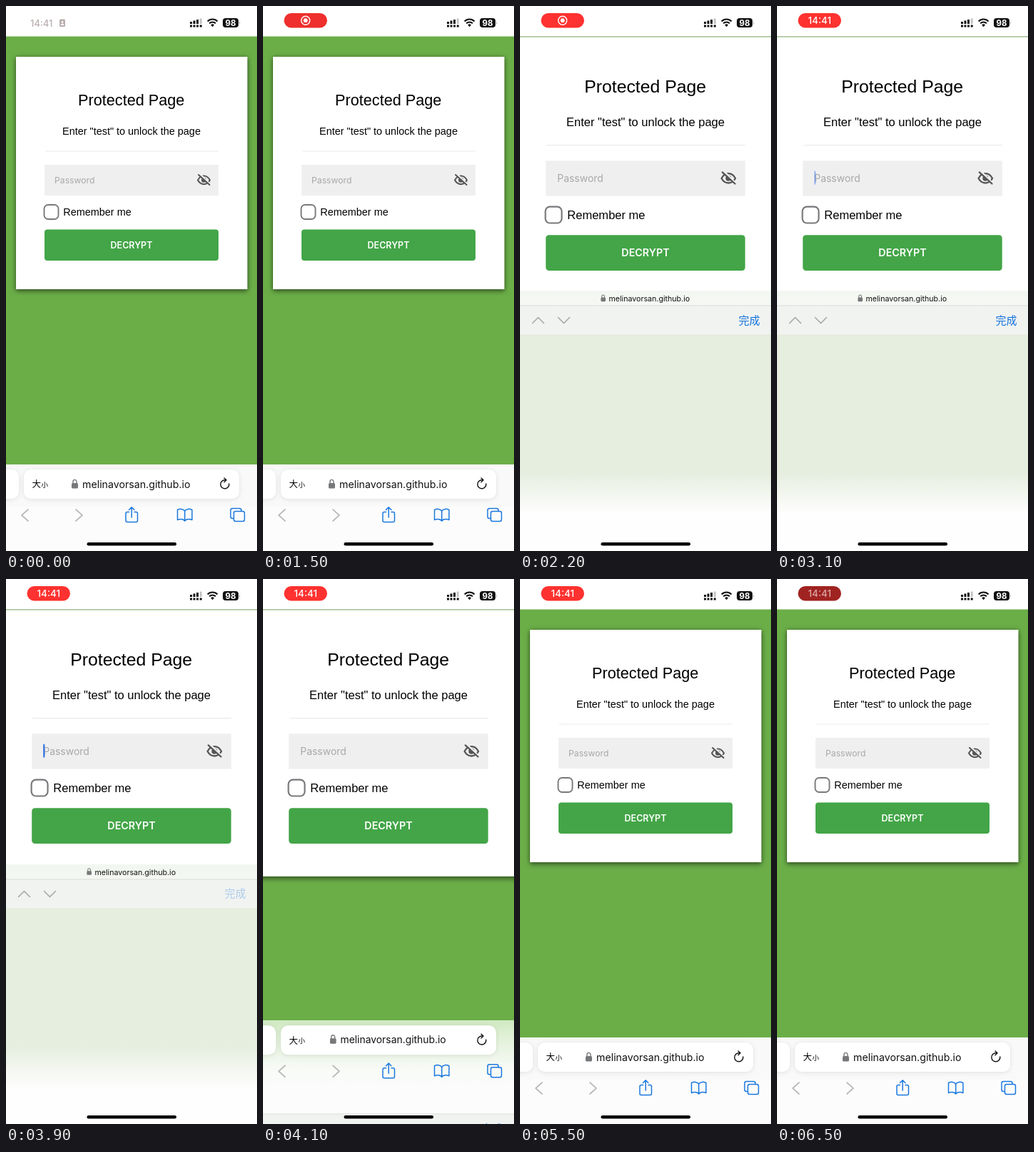
Animation, 352 px wide and 762 px high, one loop 6600 ms. Source, as an HTML page:

```html
<!DOCTYPE html>
<html lang="en">
<head>
<meta charset="utf-8">
<title>Protected Page</title>
<style>
html, body { margin: 0; width: 100%; height: 100%; overflow: hidden; background: #fff; }
svg { display: block; width: 352px; height: 762px; }
text { font-family: Inter, Roboto, sans-serif; }
.form text { font-family: "Liberation Sans", Arial, sans-serif; }
.form .ui { font-family: Inter, Roboto, sans-serif; }
text.cjk { font-family: "Noto Sans CJK SC", "Noto Sans CJK", sans-serif; }
.mid { text-anchor: middle; }
.line { fill: none; stroke-linecap: round; stroke-linejoin: round; }

.form, .bar, .tools, .tint, .url, .keys, .caret, .done, .pill, .pillbg, .rec, .time, .idle {
  animation: 6.6s linear infinite;
}
.card { filter: drop-shadow(0 0 3px rgba(0,0,0,.25)) drop-shadow(0 3px 3px rgba(0,0,0,.4)); }

.form { animation-name: zoom; transform-origin: 176px 0; }
@keyframes zoom {
  0%, 24.24% { transform: none; animation-timing-function: ease-in-out; }
  31.06%, 71.97% { transform: translateY(-38px) scale(1.146); animation-timing-function: cubic-bezier(.4,0,.6,1); }
  78.79%, 100% { transform: none; }
}

.bar { animation-name: bar; }
@keyframes bar {
  0%, 23.48% { transform: none; animation-timing-function: cubic-bezier(.2,.7,.3,1); }
  29.55%, 59.09% { transform: translateY(-243px); animation-timing-function: cubic-bezier(.4,.2,.7,.9); }
  62.12% { transform: translateY(-24px); animation-timing-function: ease-out; }
  64.85%, 100% { transform: none; }
}

.url { animation-name: url; transform-origin: 177px 669px; }
@keyframes url {
  0%, 23.48% { transform: none; animation-timing-function: cubic-bezier(.2,.7,.3,1); }
  29.55%, 59.09% { transform: translateY(-260px) scale(.75); animation-timing-function: cubic-bezier(.4,.2,.7,.9); }
  62.12% { transform: translateY(-25px) scale(.978); animation-timing-function: ease-out; }
  64.85%, 100% { transform: none; }
}

.keys { animation-name: keys; }
@keyframes keys {
  0%, 23.48% { transform: translateY(345px); animation-timing-function: cubic-bezier(.2,.7,.3,1); }
  29.55%, 59.09% { transform: none; animation-timing-function: cubic-bezier(.4,.2,.7,.9); }
  62.12% { transform: translateY(329px); animation-timing-function: ease-out; }
  64.4%, 100% { transform: translateY(345px); }
}

.tools { animation-name: tools; }
@keyframes tools {
  0%, 23.48% { opacity: 1; }
  25.76%, 59.85% { opacity: 0; }
  61.8%, 100% { opacity: 1; }
}

.tint { animation-name: tint; }
@keyframes tint {
  0%, 23.48% { opacity: 0; }
  29.55%, 59.09% { opacity: .12; }
  61.5%, 64% { opacity: 1; }
  74.24% { opacity: .45; }
  78.79%, 100% { opacity: 0; }
}

.caret { animation-name: caret; }
@keyframes caret {
  0%, 38.6% { opacity: 0; }
  39.4%, 46.2% { opacity: 1; }
  47.7%, 53.8% { opacity: 0; }
  54.6%, 60% { opacity: 1; }
  60.6%, 100% { opacity: 0; }
}

.done { animation-name: done; }
@keyframes done {
  0%, 56.8% { opacity: 1; }
  57.6%, 59.2% { opacity: .3; }
  61.5%, 100% { opacity: 1; }
}

.pill { animation-name: pill; }
@keyframes pill {
  0%, 1% { opacity: 0; }
  6%, 100% { opacity: 1; }
}
.pillbg { animation-name: pillbg; }
@keyframes pillbg {
  0%, 22.8% { fill: #ee2f2d; }
  30%, 65% { fill: #fe3230; }
  74.24% { fill: #d83029; }
  78.79% { fill: #fe3230; animation-timing-function: step-end; }
  98.4%, 100% { fill: #a02321; }
}
.rec { animation-name: rec; }
@keyframes rec {
  0%, 41% { opacity: 1; }
  43.5%, 100% { opacity: 0; }
}
.time { animation-name: time; }
@keyframes time {
  0%, 42.5% { opacity: 0; }
  45.5% { opacity: 1; animation-timing-function: step-end; }
  98.4%, 100% { opacity: .6; }
}
.idle { animation-name: idle; }
@keyframes idle {
  0% { opacity: 1; }
  3.5%, 100% { opacity: 0; }
}
</style>
</head>
<body>
<svg viewBox="0 0 352 762">
  <defs>
    <linearGradient id="fade" x2="0" y2="1">
      <stop stop-color="#cfe9bf"/>
      <stop offset="1" stop-color="#fff" stop-opacity="0"/>
    </linearGradient>
    <linearGradient id="board" x2="0" y2="1">
      <stop offset=".68" stop-color="#e6eedf"/>
      <stop offset=".85" stop-color="#fefefe"/>
    </linearGradient>
    <g id="lock">
      <rect x="92" y="667" width="9" height="7.6" rx="1.5" fill="#77787a"/>
      <path class="line" d="M94 667v-2a2.5 2.6 0 0 1 5 0v2" stroke="#77787a" stroke-width="1.4"/>
    </g>
  </defs>

  <rect width="352" height="762" fill="#6bae48"/>

  <g class="form">
    <rect class="card" x="14" y="71" width="324.5" height="325" fill="#fff"/>
    <text class="mid" x="175.7" y="138.5" font-size="21.65">Protected Page</text>
    <text class="mid" x="176" y="180" font-size="14.43">Enter "test" to unlock the page</text>
    <path d="M55 203h243" stroke="#ebebeb"/>
    <rect x="54" y="222" width="244" height="43" fill="#f0eff0"/>
    <text class="ui" x="68" y="247.6" font-size="12.2" fill="#a8a8aa">Password</text>
    <rect class="caret" x="68" y="234.5" width="1.8" height="16.5" rx=".8" fill="#2b6fe6"/>
    <g class="line" stroke="#555" stroke-width="2">
      <path d="M269 243.5c4.2-8 12.800-8 17 0c-4.200 7.500-12.800 7.500-17 0z"/>
      <circle cx="277.500" cy="243.300" r="2.500" fill="#555"/>
      <path d="M271.500 235l14.500 14.500" stroke="#f0eff0" stroke-width="3"/>
      <path d="M270 236l15.500 14"/>
    </g>
    <rect x="53.500" y="278" width="20" height="20" rx="5.500" fill="#fff" stroke="#79797d" stroke-width="1.900"/>
    <text x="80.300" y="293" font-size="14.430">Remember me</text>
    <rect x="54" y="312.500" width="244" height="43.500" rx="4" fill="#43a547"/>
    <text class="ui mid" x="176" y="338.800" font-size="12.500" font-weight="600" fill="#fff">DECRYPT</text>
  </g>

  <g class="bar">
    <rect y="641" width="352" height="400" fill="#f8f9f8"/>
    <rect y="700" width="352" height="341" fill="#fcfcfc"/>
    <rect class="tint" y="641" width="352" height="105" fill="url(#fade)"/>
    <g class="tools">
      <g fill="#fff" style="filter:drop-shadow(0 1px 3px rgba(0,0,0,.1))">
        <rect x="-20" y="648" width="38" height="41" rx="10"/>
        <rect x="25" y="648" width="302" height="41" rx="10"/>
      </g>
      <text class="cjk" x="36.500" y="673.300" font-size="12.500" font-weight="500">大</text>
      <text class="cjk" x="49.500" y="673" font-size="9.500" font-weight="500">小</text>
      <g class="line" stroke="#111" stroke-width="1.400">
        <path d="M312.800 668a6 6 0 1 1-5.800-5.200h1.500"/>
        <path d="M306 660l3 2.800-3 3"/>
      </g>
      <g class="line" stroke="#b9babc" stroke-width="1.700">
        <path d="M31 704l-9 8 9 8M98 704l9 8-9 8"/>
      </g>
      <g class="line" stroke="#1c78de" stroke-width="1.500">
        <path d="M172.500 707.500h-2.500a2 2 0 0 0-2 2v10a2 2 0 0 0 2 2h12.500a2 2 0 0 0 2-2v-10a2 2 0 0 0-2-2h-2.500M176.200 715v-14M172.500 704.500l3.700-3.800 3.700 3.800"/>
        <path d="M250.700 706c-2-3.200-7-3.200-10.200-1.500v14c3.200-1.500 8.200-1.500 10.200 1.500c2-3 7-3 10.200-1.500v-14c-3.200-1.700-8.200-1.700-10.200 1.500v14"/>
        <path d="M319 716.500h-1.500a2.500 2.500 0 0 1-2.500-2.500v-9a2.500 2.500 0 0 1 2.500-2.500h10a2.500 2.500 0 0 1 2.500 2.500v1.500"/>
        <rect x="319.500" y="706.500" width="15" height="14" rx="2.500"/>
      </g>
    </g>
  </g>

  <g class="url">
    <use href="#lock"/>
    <text x="107" y="674.200" font-size="14.200" fill="#111">melinavorsan.github.io</text>
  </g>

  <g class="keys">
    <rect y="419" width="352" height="343" fill="url(#board)"/>
    <rect y="419" width="352" height="40" fill="#f1f3f1"/>
    <path d="M0 419h352" stroke="#d9ddd6"/>
    <path class="line" d="M17.500 443.500l8-8 8 8M53.500 435.500l8 8 8-8" stroke="#a3a5a4" stroke-width="1.500"/>
    <text class="cjk done" x="306.500" y="444.500" font-size="15" font-weight="500" fill="#1273de">完成</text>
  </g>

  <rect width="352" height="42.500" fill="#fff"/>
  <g class="idle" fill="#b9adad">
    <text x="34" y="28.500" font-size="13" font-weight="500">14:41</text>
    <rect x="75" y="18.500" width="8" height="10.500" rx="1.500"/>
    <circle cx="79" cy="22.300" r="1.400" fill="#fff"/>
    <path d="M76.600 27a2.400 2.400 0 0 1 4.800 0z" fill="#fff"/>
  </g>
  <g class="pill">
    <rect class="pillbg" x="29.500" y="10" width="60.500" height="20.500" rx="10.250"/>
    <g class="rec">
      <circle cx="59.700" cy="20.200" r="6" fill="none" stroke="#fff" stroke-width="1.400"/>
      <circle cx="59.700" cy="20.200" r="2.900" fill="#fff"/>
    </g>
    <text class="time mid" x="59.800" y="25" font-size="13.500" font-weight="500" fill="#fff">14:41</text>
  </g>

  <g fill="#111">
    <path d="M258 22h3v3h-3zM262.500 20.500h3v4.500h-3zM267 19h3v6h-3z"/>
    <path d="M271.700 17.500h3v7.500h-3z" fill="#c6c6c8"/>
    <path d="M258 26.500h3v3h-3zM262.500 26.500h3v3h-3zM267 26.500h3v3h-3zM271.700 26.500h3v3h-3z"/>
    <g fill="none" stroke="#111" stroke-width="2.100">
      <path d="M282.700 21.500a9.500 9.500 0 0 1 13.800 0M285.200 24.300a6.200 6.200 0 0 1 8.800 0"/>
    </g>
    <path d="M287.200 26.500a3.500 3.500 0 0 1 4.800 0l-2.400 2.700z"/>
    <rect x="304" y="17" width="22" height="13" rx="4"/>
    <path d="M327 21.500q1.800 2 0 4z" fill="#999"/>
    <text class="mid" x="315" y="27.700" font-size="11.500" font-weight="700" fill="#fff">98</text>
  </g>

  <rect x="113.500" y="750" width="125.500" height="4.600" rx="2.300"/>
</svg>
</body>
</html>
```
